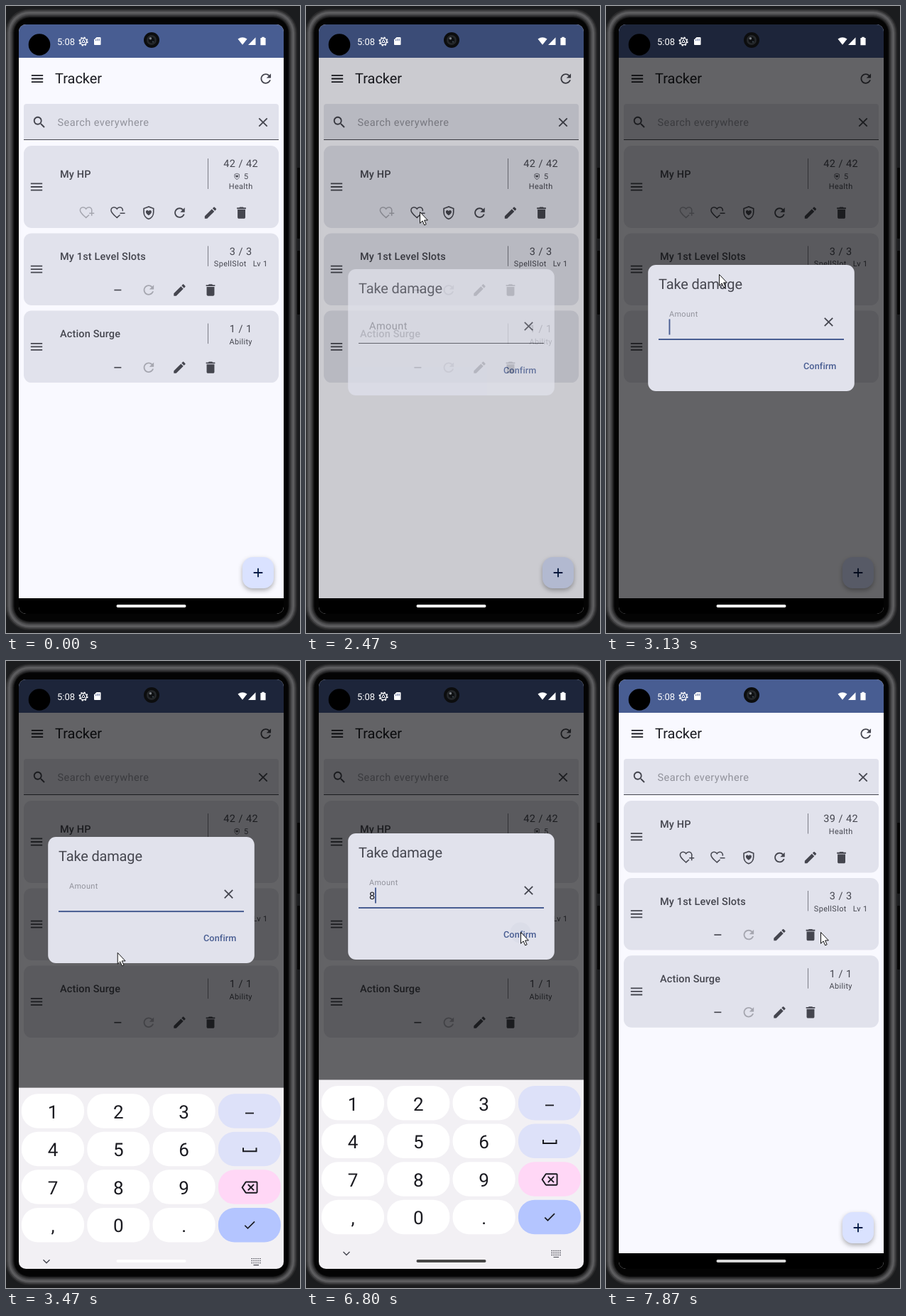
Write an HTML page that moves like this. It is 414x884 px and loops after 8 s.

```html
<!DOCTYPE html>
<html lang="en">
<head>
<meta charset="utf-8">
<title>Tracker</title>
<style>
html, body { margin: 0; width: 100%; height: 100%; overflow: hidden; background: #1b1c1e; }
svg { display: block; position: absolute; left: 0; top: 0; }
text { font-family: Roboto, "Open Sans", sans-serif; fill: #45464f; text-rendering: geometricPrecision; white-space: pre; }
.body { font-size: 14.5px; letter-spacing: .45px; }
.small { font-size: 10.9px; letter-spacing: .36px; }
.head { font-size: 14.5px; font-weight: 500; letter-spacing: .136px; }
.title { font-size: 19.95px; }
#dialog .title { letter-spacing: -.13px; }
.btn { font-size: 12.7px; font-weight: 500; letter-spacing: .09px; }
.key { font-size: 26px; fill: #1b1b21; }
.mid { text-anchor: middle; }
.hint { fill: #91929b; }
</style>
</head>
<body>
<svg id="stage" width="414" height="884" viewBox="0 0 414 884"></svg>
<script>
const INK = '#45464f', DARK = '#1a1b21', CARD = '#e1e2ec', BLUE = '#485d92';

const ICONS = {
  menu: 'M3 18h18v-2H3v2zm0-5h18v-2H3v2zm0-7v2h18V6H3z',
  search: 'M15.5 14h-.79l-.28-.27C15.41 12.59 16 11.11 16 9.5 16 5.91 13.09 3 9.5 3S3 5.91 3 9.5 5.91 16 9.5 16c1.61 0 3.09-.59 4.23-1.57l.27.28v.79l5 4.99L20.49 19l-4.99-5zm-6 0C7.01 14 5 11.99 5 9.5S7.01 5 9.5 5 14 7.01 14 9.5 11.99 14 9.5 14z',
  close: 'M19 6.41L17.59 5 12 10.59 6.41 5 5 6.41 10.59 12 5 17.59 6.41 19 12 13.41 17.59 19 19 17.59 13.41 12z',
  refresh: 'M17.65 6.35C16.2 4.9 14.21 4 12 4c-4.42 0-7.99 3.58-7.99 8s3.57 8 7.99 8c3.73 0 6.84-2.55 7.73-6h-2.08c-.82 2.33-3.04 4-5.65 4-3.31 0-6-2.69-6-6s2.69-6 6-6c1.66 0 3.14.69 4.22 1.78L13 11h7V4l-2.35 2.35z',
  edit: 'M3 17.25V21h3.75L17.81 9.94l-3.75-3.75L3 17.25zM20.71 7.04c.39-.39.39-1.02 0-1.41l-2.34-2.34c-.39-.39-1.02-.39-1.41 0l-1.83 1.83 3.75 3.75 1.83-1.83z',
  trash: 'M6 19c0 1.1.9 2 2 2h8c1.1 0 2-.9 2-2V7H6v12zM19 4h-3.5l-1-1h-5l-1 1H5v2h14V4z',
  add: 'M19 13h-6v6h-2v-6H5v-2h6V5h2v6h6v2z',
  minus: 'M17.5 12.9h-11v-1.8h11z',
  back: 'M22 3H7c-.69 0-1.23.35-1.59.88L0 12l5.41 8.11c.36.53.9.89 1.59.89h15c1.1 0 2-.9 2-2V5c0-1.1-.9-2-2-2zm0 16H7.07L2.4 12l4.66-7H22v14zm-11.59-2L14 13.41 17.59 17 19 15.59 15.41 12 19 8.41 17.59 7 14 10.59 10.41 7 9 8.41 12.59 12 9 15.59z',
  check: 'M9 16.17L4.83 12l-1.42 1.41L9 19 21 7l-1.41-1.41z'
};

const rect = (x, y, w, h, r, fill, more = '') =>
  `<rect x="${x}" y="${y}" width="${w}" height="${h}" rx="${r}" fill="${fill}" ${more}/>`;
const text = (x, y, cls, s, more = '') => `<text x="${x}" y="${y}" class="${cls}" ${more}>${s}</text>`;
const line = (d, color, w, more = '') =>
  `<path d="${d}" fill="none" stroke="${color}" stroke-width="${w}" ${more}/>`;
const at = (x, y, s, inner, more = '') => `<g transform="translate(${x} ${y}) scale(${s})" ${more}>${inner}</g>`;
const icon = (name, x, y, color = INK, alpha = 1, s = .907) =>
  at(x, y, s, `<path transform="translate(-12 -12)" d="${ICONS[name]}" fill="${color}"/>`, `opacity="${alpha}"`);

const shield = (x, y, s) => at(x, y, s,
  line('M0-9-7.1-6.3V-1C-7.1 3.8-4.1 7.8 0 9.1 4.1 7.8 7.1 3.8 7.1-1V-6.3z', INK, 1.7) +
  `<path d="M0 3.8C-2.6 1.6-4.2.3-4.2-1.5-4.2-3.9-1.2-4.5 0-2.4 1.2-4.5 4.2-3.9 4.2-1.5 4.2.3 2.6 1.6 0 3.8z" fill="${INK}"/>`);

const heart = (x, y, sign, alpha) => at(x, y, 1,
  line('M6.9-2.4C7.6-5.4 5.7-7.9 3-7.9 1.3-7.9-.2-7-1.1-5.6-2-7-3.5-7.9-5.2-7.9-7.9-7.9-9.6-5.8-9.4-3.2-9.1.4-5 3.3-1.1 6.8L3.2 2.9', INK, 1.5) +
  line(sign === '+' ? 'M3.4.6H10.4M6.9-2.9V4.1' : 'M3.2.6H10.2', INK, 1.5), `opacity="${alpha}"`);

const slot = i => 113.8 + 43.55 * i;

function card(y, name, value, sub, o = {}) {
  const h = o.temp ? 116 : 101.5, grow = o.temp ? 7.25 : 0, row = y + h - 21.4;
  let s = rect(25, y, 359, h, 11, CARD) +
    icon('menu', 43, y + h / 2) +
    text(76, y + 37.6 + grow, 'head', name) +
    rect(284, y + 18, 1, h - 73, 0, '#7c7d87') +
    text(330.7, y + 30.4, 'body mid', value) +
    text(330.7, y + (o.temp ? 61.2 : 47), 'small mid', sub);
  if (o.temp) s += shield(325.2, y + 43.3, .46) + text(335, y + 47.3, 'small', o.temp);
  s += o.hp
    ? heart(slot(0), row, '+', o.full ? .38 : 1) + heart(slot(1), row, '-', 1) + shield(slot(2), row, .96) + icon('refresh', slot(3), row) +
      icon('edit', slot(4), row) + icon('trash', slot(5), row)
    : icon('minus', slot(1), row) + icon('refresh', slot(2), row, INK, .38) +
      icon('edit', slot(3), row) + icon('trash', slot(4), row);
  return s;
}

const list = (id, hp, y2) => `<g id="${id}">` + hp +
  card(y2, 'My 1st Level Slots', '3 / 3', 'SpellSlot\u00a0\u00a0 Lv 1') +
  card(y2 + 109.2, 'Action Surge', '1 / 1', 'Ability') + '</g>';

// Metal rim: nested rounded plates from the outer edge to the black bezel.
const RIM = [[0, '#2b2b2c'], [2, '#444446'], [4, '#5c5c5e'], [7, '#4a4a4c'], [9, '#303031'], [11, '#171718'], [12.5, '#040404']];
const phone =
  rect(0, 0, 414, 884, 0, '#1b1c1e') +
  rect(410, 228, 4, 100, 1, '#050505') + rect(410, 345, 4, 90, 1, '#050505') +
  RIM.map(([d, color]) => rect(d - 1, 4 + d, 411 - 2 * d, 876 - 2 * d, 34 - d, color)).join('');

const app =
  rect(18, 26, 373, 831, 0, '#f9f9ff') +
  rect(18, 26, 373, 47, 0, BLUE) +
  icon('menu', 44, 102.5, DARK) + text(69, 109, 'title', 'Tracker', `style="fill:${DARK}"`) +
  icon('refresh', 365.8, 102.5) +
  `<path d="M25 189V142q0-4 4-4H380q4 0 4 4V189z" fill="${CARD}"/>` + rect(25, 188, 359, 1, 0, INK) +
  icon('search', 47, 164) + text(72.5, 169, 'body hint', 'Search everywhere') + icon('close', 362, 164) +
  list('before', card(197, 'My HP', '42 / 42', 'Health', { hp: 1, full: 1, temp: '5' }), 320.4) +
  list('after', card(197, 'My HP', '39 / 42', 'Health', { hp: 1 }), 306) +
  rect(333, 777, 44, 44, 14.5, '#dae2ff', 'style="filter:drop-shadow(0 3px 3px rgba(0,0,0,.3))"') +
  icon('add', 355, 799, '#001946');

const dialog = `<g id="dialog">` +
  rect(59.2, 0, 290.6, 178, 11, CARD) +
  text(74, 34, 'title', 'Take damage') +
  text(89, 85, 'body hint', 'Amount', 'id="label"') +
  text(89, 93, 'body', '8', `id="digit" style="fill:${DARK}"`) +
  icon('close', 313.5, 80.5) +
  `<rect id="rule" x="74" y="104" width="261"/>` +
  rect(88.5, 76.5, 1.9, 22, 0, BLUE, 'id="caret"') +
  text(278, 146.5, 'btn', 'Confirm', `style="fill:${BLUE}"`) +
  `<circle id="ripple" cx="302" cy="140" fill="${BLUE}" fill-opacity=".04"/></g>`;

function keyboard() {
  const tints = ['#dde1f9', '#dde1f9', '#ffd7f6', '#b4c5ff'];
  let s = rect(18, 590.5, 373, 267, 0, '#f2f0f4');
  ['123', '456', '789', ',0.'].forEach((row, j) => {
    const y = 599 + 53.6 * j;
    for (let i = 0; i < 4; i++) {
      const x = 22 + 92.3 * i;
      s += rect(x, y, 88, 48.5, 23, i < 3 ? '#fff' : tints[j]);
      if (i < 3) s += text(x + 44, y + 34.5, 'key mid', row[i]);
    }
  });
  s += rect(337, 625.5, 12, 1.8, 0, DARK) + line('M334 675V680H352.5V675', DARK, 2) +
    icon('back', 343, 731, DARK, 1, .96) + icon('check', 343, 784, DARK, 1, .85) +
    line('M52.5 833 57 837.5 61.5 833', INK, 1.4);
  for (let j = 0; j < 3; j++)
    s += line(`M345.5 ${831.5 + 3 * j}H359`, INK, 1.3, 'stroke-dasharray="1.5 1.4"');
  return `<g id="keyboard">${s}${line('M348.5 840.5H356', INK, 1.2)}</g>`;
}

const status =
  text(72, 54.6, '', '5:08', 'style="fill:#fff;font-size:13px"') +
  `<g fill="none" stroke="#fff"><circle cx="109" cy="50" r="4.6" stroke-width="1.3"/>
   <circle cx="109" cy="50" r="5.8" stroke-width="1.6" stroke-dasharray="2.2 2.355"/>
   <circle cx="109" cy="50" r="1.7" stroke-width="1"/><path d="M109 45.5V48.3M105.2 52.4 107.6 50.9M112.8 52.4 110.4 50.9"/></g>` +
  `<g fill="#fff"><path d="M127.5 44H132.5q1 0 1 1V54q0 1-1 1H125q-1 0-1-1V47.5z"/>
   <path d="M326.5 46.5Q333 41.8 339.5 46.5L333 54.8z"/><path d="M341 55H351.5V44.3z"/>
   <path d="M360.2 43.7H363.8V45H365.6V55.3H358.4V45H360.2z"/></g>` +
  line('M126.6 47V49.2M128.9 46V49.2M131.2 46V49.2', BLUE, .9) +
  `<circle cx="47" cy="54.5" r="15.3"/><circle cx="205" cy="48" r="11" fill="#0c0d0e"/>
   <circle cx="205" cy="48" r="7" fill="#24272a"/><circle cx="205" cy="48" r="4.3" fill="#0e1012"/>
   <circle cx="203.4" cy="45.8" r="1.8" fill="#777c80"/><circle cx="207" cy="50.5" r="1.1" fill="#3d4650"/>`;

document.getElementById('stage').innerHTML =
  `<defs><clipPath id="screen"><rect x="18" y="26" width="373" height="831" rx="10"/></clipPath></defs>` +
  phone + `<g clip-path="url(#screen)">` + app +
  rect(18, 26, 373, 831, 0, '#000', 'id="scrim"') + dialog +
  rect(18, 835, 373, 22, 0, '#000') + keyboard() +
  rect(155.5, 844, 98, 4, 2, '#fff', 'id="pill"') + status + '</g>' +
  `<path id="mouse" d="M.5.5V16.3L4.1 12.9 6.7 18.9 9.2 17.8 6.6 12H11.4z" fill="#fff" stroke="#111" stroke-width="1"/>`;

const $ = id => document.getElementById(id);
const el = Object.fromEntries(['before', 'after', 'scrim', 'dialog', 'label', 'digit', 'rule', 'caret',
  'ripple', 'keyboard', 'pill', 'mouse'].map(id => [id, $(id)]));

// Tracks are rows of [ms, value, ...], read with straight steps between rows.
const TRACKS = {
  mouse: [[200, 404, 872], [470, 350, 690], [730, 276, 472], [930, 237, 380], [1000, 232, 368],
    [1200, 190, 322], [1330, 166, 296], [1400, 166, 296], [1600, 160, 290], [2670, 160, 290],
    [3130, 159, 378], [3330, 158, 400], [3870, 153, 442], [5600, 153, 442],
    [5870, 192, 428], [6200, 270, 396], [6470, 302, 382]],
  scrim: [[2460, 0], [2470, .185], [2670, .6], [6870, .6], [7130, 0]],
  dialog: [[2460, 0], [2470, .74], [2570, 1], [6870, 1], [7070, 0]],
  drop: [[2470, 6], [2600, 0]],
  label: [[2600, 0], [2760, 1]],
  pill: [[4000, 255], [4130, 225], [4330, 225], [4530, 160], [4800, 160], [5130, 70],
    [7400, 70], [7730, 190], [7870, 216]]
};

function read(rows, t) {
  const i = rows.findIndex(r => r[0] > t);
  if (i === 0) return rows[0].slice(1);
  if (i < 0) return rows[rows.length - 1].slice(1);
  const a = rows[i - 1], b = rows[i], k = (t - a[0]) / (b[0] - a[0]);
  return a.slice(1).map((v, n) => v + (b[n + 1] - v) * k);
}
const part = (t, a, b) => Math.min(1, Math.max(0, (t - a) / (b - a)));
const easeOut = k => 1 - (1 - k) ** 3;
const blink = (t, from, half) => Math.floor((t - from) / half) % 2 === 0;
const show = (node, on) => node.setAttribute('visibility', on ? 'visible' : 'hidden');
const set = (node, o) => { for (const k in o) node.setAttribute(k, o[k]); };

function draw(t) {
  const get = name => read(TRACKS[name], t);
  const [mx, my] = get('mouse');
  show(el.mouse, t >= 200);
  set(el.mouse, { transform: `translate(${mx} ${my})` });

  const done = t >= 6930;
  show(el.before, !done);
  show(el.after, done);
  set(el.scrim, { opacity: get('scrim')[0] });

  const rise = easeOut(part(t, 3150, 3640));
  const fall = part(t, 6870, 7270) ** 1.5;
  set(el.dialog, {
    opacity: get('dialog')[0],
    transform: `translate(0 ${365 + get('drop')[0] - 122 * rise})`
  });
  set(el.keyboard, { transform: `translate(0 ${267 * (1 - rise + fall)})` });

  const up = get('label')[0], focus = t >= 2640;
  set(el.label, { y: 85 - 12 * up, style: `font-size:${14.5 - 3.6 * up}px;letter-spacing:${.45 - .09 * up}px` });
  set(el.rule, { height: focus ? 2 : 1, fill: focus ? BLUE : INK });

  const typed = t >= 5730;
  show(el.digit, typed);
  show(el.caret, focus && (t < 5670 ? blink(t, 2640, 496) : blink(t, 5670, 530)));
  set(el.caret, { x: typed ? 97 : 88.5 });
  set(el.ripple, { r: t < 6730 ? 0 : 8 + 12 * part(t, 6730, 6860) });

  const p = Math.round(get('pill')[0]);
  set(el.pill, { fill: `rgb(${p},${p},${p})` });
}

// The picture moves 15 times a second, on times rounded to 10 ms.
const STEP = 1000 / 15, LOOP = 8000;
const start = performance.now();
function tick() {
  const t = (performance.now() - start) % LOOP;
  draw(Math.round(Math.floor((t + 4) / STEP) * STEP / 10) * 10);
  requestAnimationFrame(tick);
}
draw(0);
requestAnimationFrame(tick);
</script>
</body>
</html>
```
